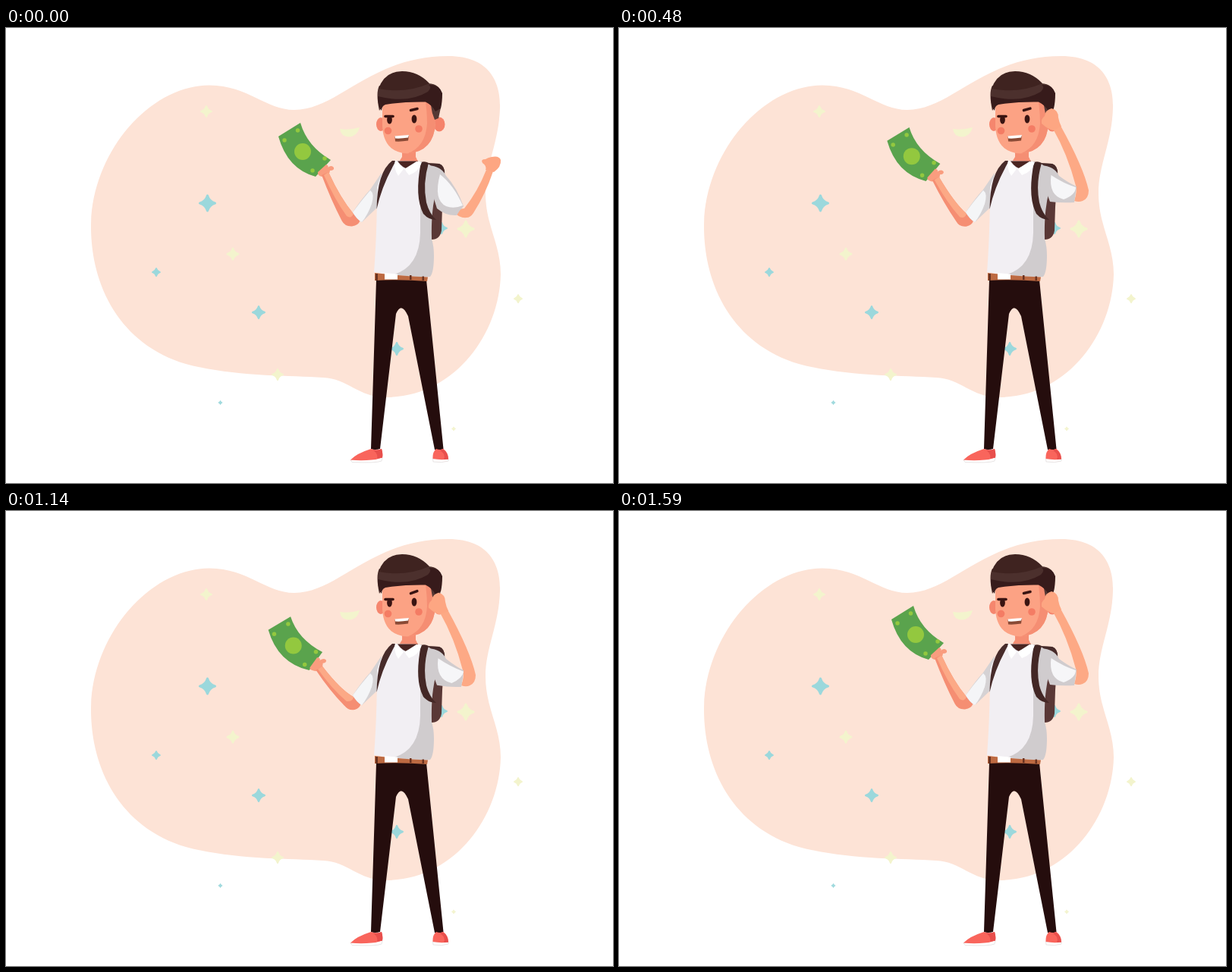
Recreate the animation shown at these times as an HTML page. Size 800x600 px, loop 1.62 s.

```html
<!DOCTYPE html>
<html lang="en">
<head>
<meta charset="utf-8">
<title>Man with a banknote</title>
<style>
html, body { margin: 0; width: 100%; height: 100%; overflow: hidden; background: #fff; }
svg { display: block; width: 100vw; height: 100vh; }
.shade { fill: #f58e73; }
.skin { fill: #fca284; }
.arm { fill: #fda985; }
.cloth { fill: #f2eff3; }
.grey { fill: #d0ccce; }
.dark { fill: #3f2320; }
.ink { fill: #3a1412; }
.line { fill: none; stroke-linecap: round; }
</style>
</head>
<body>
<svg viewBox="0 0 800 600">
  <path fill="#fde3d6" d="M112 262C112 167 187 76 268 75.500C320 76 342 108 380 108C438 108 480 37 583 37C640 37 652 75 651 105C650 150 632 180 632 218C632 260 652 285 652 325C650 405 590 487 500 487C465 487 450 462 418 461C370 458 300 460 237 443C150 417 112 340 112 262Z"/>
  <g id="stars"></g>
  <path fill="#f3f4cd" d="M440 133Q453 135 466 131Q463 143 452 143.500Q441 143 440 133Z"/>

  <g id="pack">
    <path fill="#5a3836" d="M552 178L571 179Q579 182 578 194L575 236L574 267Q572 279 561 279L556 240Z"/>
    <path fill="#472b2a" d="M552 178L571 179Q579 182 578 194L577 205L556 186Z"/>
  </g>

  <g id="legs">
    <path fill="#250d0d" d="M488 332H554L576.500 555Q570 558 565 556L530 380Q521 360 514 377L493 555Q486 557 481 555Z"/>
    <path fill="#fff" stroke="#dedada" stroke-width=".7" d="M454 569.500Q475 567 496 566L495 571Q488 574 456 572.500Z M562.500 568L583 567.500L583 571Q574 574 563 572Z"/>
    <path fill="#f9655c" d="M454 569.500Q462 561 481 555Q487 558 495 555Q497 561 496 566.500Q489 569 482 569.500Q468 571 454 569.500Z M562.500 568Q562 559 567 555Q572 557 576.500 555Q583 560 583 568.500Q573 570 562.500 568Z"/>
    <path fill="#e84f4c" d="M482 555Q488 558 495 555Q497 561 496 566.500L489 568Q491 561 482 555Z M575 555Q583 560 583 568.500L577 569Q580 562 572 557Z"/>
  </g>

  <path class="shade" d="M522 158H540V170L544 178H517L522 170Z"/>

  <path id="bill" fill="#5aa34d"/>
  <path id="coin" class="line" stroke="#93c83f" stroke-width="22"/>
  <path id="dots" class="line" stroke="#93c83f" stroke-width="5.500"/>
  <path id="hand" fill="#f99d7f"/>
  <path id="fore" class="shade"/>
  <path id="foreLight" fill="#fca986"/>
  <path fill="#d5d2d4" d="M495 191L480 213Q468 226 457 243Q462 252 469 256L490 236Z"/>
  <path fill="#f4f5f7" d="M457 243Q468 228 480 214Q486 218 482 232Q477 246 469 256Q462 252 457 243Z"/>

  <g id="shirt">
    <path class="cloth" d="M512 175Q493 190 489 210Q489 270 485 322Q520 327 552 328L558 186Q550 176 546 176Z"/>
    <path class="grey" d="M546 176L556 179Q568 184 567 215Q560 240 561 278Q564 288 564 300Q564 322 559 328Q535 329 511 325Q545 315 546 270Z"/>
    <path fill="#472b2a" d="M509 175Q489 190 488.500 239Q495 208 514 175Z"/>
    <path fill="#432725" d="M547 177Q552 175 557 178Q549 205 554 230Q558 245 567 253Q557 253 550 245Q538 222 547 177Z"/>
    <path fill="#4a2522" d="M516 175.500H543Q530 195 516 175.500Z"/>
    <path fill="#fff" d="M513 174L524 186L517 195Q510 184 513 174Z M548 177L541 176L525 186L531 194Q544 190 548 177Z"/>
  </g>

  <g id="belt">
    <path fill="#bd6a42" d="M486 323Q520 327 556 328.500L555 334Q520 331 486 333Z"/>
    <path fill="#6b3320" d="M487 324H490V333H487Z M532 326H534.500V332H532Z M548.500 327.500H551V333H548.500Z"/>
    <path fill="#fff" d="M499 323L516 324.500V331.500H499Z"/>
  </g>

  <g id="head">
    <ellipse cx="494" cy="127" rx="6" ry="9" fill="#f5866e"/>
    <ellipse cx="571" cy="127" rx="7.500" ry="9.500" fill="#f5836b"/>
    <path class="skin" d="M496 92V130Q498 164 529 165.500Q564 163 566 125V94Z"/>
    <path class="shade" d="M552 92Q555 108 555 126Q553 157 529 165.500Q564 163 566 125V94Z"/>
    <circle cx="503.500" cy="135.500" r="4.800" fill="#f47c64"/>
    <circle cx="544" cy="133" r="4.800" fill="#f47c64"/>
    <ellipse class="ink" cx="505.500" cy="121" rx="3.400" ry="5.500"/>
    <ellipse class="ink" cx="538" cy="120" rx="3.400" ry="5.500"/>
    <path class="line" stroke="#3a1412" stroke-width="3.600" d="M500 116.500H510"/>
    <path class="line" stroke="#3a1412" stroke-width="3.600" id="brow"/>
    <path fill="#8a4a35" d="M512.500 143L531 141.500L530 148.500Q521 150 513 149.500Z"/>
    <path fill="#fff" d="M512.500 142.500L531 141L530 144.500Q521 146 513 145.500Z"/>
    <path fill="#553834" d="M558 92L573 105L570 119L565 121Q561 112 560 102Z"/>
    <path fill="#4c302d" d="M492 109Q487 85 492 76L557 73Q572 74 575 88L553 97Q525 96 498 100Z"/>
    <path class="dark" d="M491 80Q499 57 522 57Q543 57 558 73Q527 87 491 80Z"/>
    <path fill="#371b1b" d="M490 90Q490 104 495 109Q495 103 500 101Q525 97 553 97.500Q562 102 566 110L573 106Q575 98 575 86Q571 74 557 75Q562 78 556 84Q530 100 490 90Z"/>
  </g>

  <path id="fore2" class="arm"/>
  <path id="fist" fill="#fda682"/>
  <path id="sleeve" class="grey"/>
  <path id="sleeveLight" fill="#f6f6f8"/>
</svg>
<script>
const $ = id => document.getElementById(id);

// Stars: x, y, radius
const teal = [[265.5, 231, 11.5], [198, 322, 6], [333, 375, 9], [282.5, 494, 3], [515, 423, 9], [574, 264, 8]];
const cream = [[264, 110, 8], [299, 298, 8.5], [358, 457, 8], [606, 265, 11.5], [675, 357, 6], [590, 528.5, 3]];
const star = (color, [x, y, r]) =>
  `<path transform="translate(${x} ${y}) scale(${r})" fill="${color}" stroke="${color}" stroke-width=".28"
    stroke-linejoin="round" d="M0-.86Q.2-.2.86 0Q.2.2 0 .86Q-.2.2-.86 0Q-.2-.2 0-.86Z"/>`;
$('stars').innerHTML = teal.map(s => star('#9bd8dc', s)).join('') + cream.map(s => star('#f3f4cd', s)).join('');

// Raised, middle and lowered poses
const left = {
  bill: [
    'M388 125Q397 156 428 174L408 196Q371 186 359 143Z',
    'M360 156Q371 185 404 201L389 227Q344 218 330 173Z',
    'M342 176Q356 205 388 220L375 248Q328 240 311 193Z'],
  coin: ['M391 163h0', 'M364.5 194.5h0', 'M347.5 215h0'],
  dots: [
    'M384.5 135h0M367 148h0M420 172h0M404 188h0',
    'M357 166h0M338 179h0M395 202h0M382 219.5h0',
    'M339 187h0M320 199h0M379 221.5h0M368.500 240h0'],
  hand: [
    'M416 196Q410 194 411 190L422 180Q426 182 424 184Q429 180 432 184Q433 188 427 188Q426 193 425 193Z',
    'M399 228Q388 227 389 224L398 209Q404 210 402 213Q408 209 410 212Q411 215 406 217Q406 222 407 224Z',
    'M389 247Q377 245 376 243L386 229Q391 230 390 233Q394 229 396 232Q396 236 391 238Q391 242 396 243Z'],
  fore: [
    'M416 194Q429 228 442 253Q446 262 456 261.5Q466 260 467 252Q463 247 458 245Q441 225 425 190Z',
    'M399 227Q422 249 447 260Q455 265 462 263Q469 260 468 252Q463 248 458 246Q438 246 407 222Z',
    'M387 246Q408 258 440 260Q455 266 462 265Q469 262 468 252Q464 249 457 248Q428 252 394 243Z'],
  foreLight: [
    'M419 194Q433 226 449 248Q455 252 458 245Q441 225 425 190Z',
    'M401 225Q423 245 447 254Q457 253 458 246Q438 246 407 222Z',
    'M388 244Q410 255 442 257Q456 257 457 248Q428 252 394 243Z'],
  brow: ['M533.5 108.500L542 106.500', 'M533.5 108.500L541.500 104.500', 'M533.500 108L541 103']
};

// Arm out, hand at ear, hand at ear and lower
const right = {
  fore2: [
    'M633 187Q622 215 604 238Q594 238 592 244Q598 251 607 250Q612 250 616 244Q632 219 642 189Z',
    'M572 133Q591 166 602 208Q604 216 600 228Q606 230 611 228Q619 225 619 214Q612 183 582 129Z',
    'M572 138Q591 171 602 215Q606 222 600 235Q606 238 611 236Q619 232 619 222Q612 190 582 134Z'],
  fist: [
    'M632 187Q634 182 628 178Q625 173 632 173Q635 171 640 170Q650 168 652 174Q653 183 643 190Z',
    'M572 135Q566 134 557 126Q556 120 561 116Q562 108 570 106Q579 108 579 118Q580 124 583 130Z',
    'M572 140Q566 140 557 132Q556 126 561 122Q562 114 570 112Q579 114 579 124Q580 130 583 136Z'],
  sleeve: [
    'M556 181Q574 182 580 195Q594 210 603 235Q598 240 594 247Q580 248 568 238Q560 215 556 181Z',
    'M556 181Q574 182 580 195Q592 204 603 209Q602 218 600 230Q584 231 568 229Q560 210 556 181Z',
    'M556 181Q574 182 580 195Q592 206 604 214Q603 226 600 237Q584 237 568 232Q560 212 556 181Z'],
  sleeveLight: [
    'M572 193Q590 207 602 234Q590 239 580 235Q563 227 572 193Z',
    'M569.5 194Q586 205 602 210Q602 220 586 226Q566 221 569.5 194Z',
    'M569.5 195Q588 208 606 216Q602 220 591 230Q566 225 569.5 195Z']
};

const NUM = /\d+(\.\d+)?/g;
const parse = poses => ({ shape: poses[0], values: poses.map(d => d.match(NUM).map(Number)) });
for (const set of [left, right]) for (const id in set) set[id] = parse(set[id]);

function pose(set, weights) {
  for (const id in set) {
    const { shape, values } = set[id];
    let i = 0;
    const d = shape.replace(NUM, () => {
      const v = values.reduce((sum, list, k) => sum + list[i] * weights[k], 0);
      i++;
      return v.toFixed(2);
    });
    $(id).setAttribute('d', d);
  }
}

const STEP = 30, LOOP = 1620;
const swing = [[0, 0], [10, 1], [17.7, 0], [26.5, .93], [35.3, 0], [43, 1], [53, 0]];
const ease = x => (1 - Math.cos(Math.PI * x)) / 2;

function swingAt(n) {
  const k = Math.max(1, swing.findIndex(s => s[0] >= n));
  const [a, from] = swing[k - 1], [b, to] = swing[k];
  return from + (to - from) * ease((n - a) / (b - a));
}

// Quadratic through the poses at 0, .6 and 1
const through = p => [(p - .6) * (p - 1) / .6, p * (1 - p) / .24, p * (p - .6) / .4];

function draw(now) {
  const n = Math.floor(now % LOOP / STEP);
  const p = swingAt(n);
  pose(left, through(p));
  if (n < 10) {
    const e = ease(n / 10);
    pose(right, [1 - e, e, 0]);
  } else {
    const w = n < 18 ? 0 : p;
    pose(right, [0, 1 - w, w]);
  }
}

let start;
function tick(now) {
  start ??= now;
  draw(now - start);
  requestAnimationFrame(tick);
}
draw(0);
requestAnimationFrame(tick);
</script>
</body>
</html>
```
